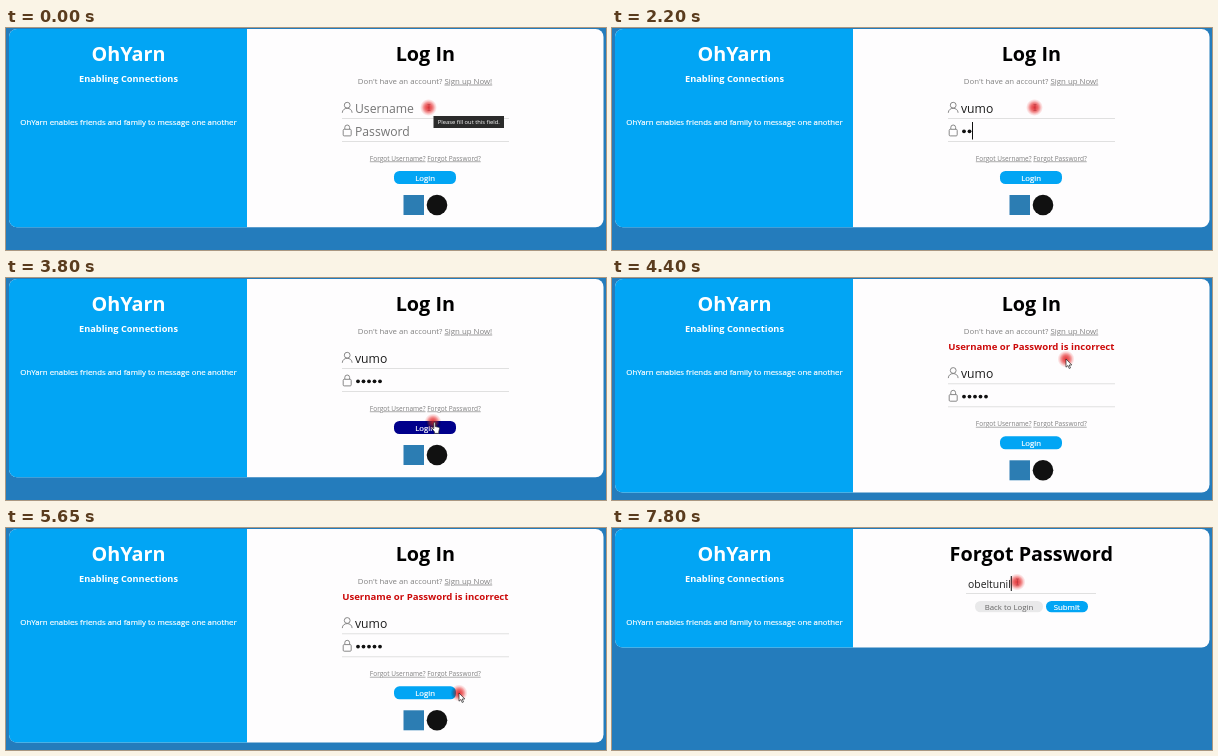
Animation, 600 px wide and 222 px high, one loop 8 s. Source, as an HTML page:

```html
<!DOCTYPE html>
<html lang="en">
<head>
<meta charset="utf-8">
<title>Log in</title>
<style>
  html, body { margin: 0; width: 100%; height: 100%; overflow: hidden; background: #247cbc; }
  svg { display: block; width: 100vw; height: 100vh; }
  text { font-family: "Open Sans", "Noto Sans", sans-serif; font-size: 7.83px; white-space: pre; }
  .mid { text-anchor: middle; }
  .title { font-size: 19.8px; font-weight: 700; }
  .sub { font-size: 9.23px; font-weight: 700; }
  .error { font-size: 9.6px; font-weight: 700; fill: #cc0a0a; }
  .field { font-size: 12.2px; fill: #1c1c1c; }
  .email { font-size: 10.4px; }
  .field.empty { fill: #757575; }
  .small { font-size: 6.53px; }
  .grey { fill: #808080; }
  .link { text-decoration: underline; }
  .white { fill: #fff; }
  .firm { stroke: #fff; stroke-width: .2; }
  .panel { fill: #02a5f4; }
  .rule { stroke: #e0e0e0; stroke-width: 1; }
  .icon { fill: none; stroke: #7c7c7c; stroke-width: .9; }
</style>
</head>
<body>
<svg viewBox="0 0 600 222" preserveAspectRatio="none">
  <defs>
    <clipPath id="cardClip"><rect id="card" x="3" y="1" width="594.5" height="198.3" rx="8"/></clipPath>
    <radialGradient id="halo">
      <stop offset="0" stop-color="#ee6464"/>
      <stop offset=".4" stop-color="#f48e8e"/>
      <stop offset=".75" stop-color="#facccc"/>
      <stop offset="1" stop-color="#fff"/>
    </radialGradient>
    <radialGradient id="core">
      <stop offset="0" stop-color="#e0282c" stop-opacity=".75"/>
      <stop offset=".5" stop-color="#e2383c" stop-opacity=".45"/>
      <stop offset="1" stop-color="#e84a4a" stop-opacity="0"/>
    </radialGradient>
  </defs>

  <rect width="600" height="222" fill="#247cbc"/>
  <g clip-path="url(#cardClip)">
    <rect width="600" height="222" fill="#fefdfe"/>
    <rect class="panel" width="241" height="222"/>
  </g>
  <g class="white mid">
    <text class="title" x="122.5" y="33">OhYarn</text>
    <text class="sub" x="122.5" y="53.8">Enabling Connections</text>
    <text class="firm" x="122.5" y="96.6">OhYarn enables friends and family to message one another</text>
  </g>

  <g id="login">
    <text class="title mid" x="419.3" y="33">Log In</text>
    <text class="grey mid" x="419" y="55.6">Don't have an account? <tspan class="link">Sign up Now!</tspan></text>
    <text id="error" class="error mid" x="419.3" y="72.3">Username or Password is incorrect</text>
    <g id="form">
      <g class="icon">
        <circle cx="341.2" cy="77.2" r="2.9"/>
        <path d="M336.3 84.8c0-6 9.8-6 9.8 0"/>
        <rect x="337.2" y="101.3" width="8" height="6.6" rx="1"/>
        <path d="M338.8 101v-1.6a2.4 2.4 0 0 1 4.8 0V101"/>
      </g>
      <path class="rule" d="M336 90.5H503M336 113.5H503"/>
      <text id="user" class="field" x="349" y="85"></text>
      <text id="pass" class="field empty" x="349" y="108">Password</text>
      <g id="dots" fill="#111"></g>
      <text class="small grey mid" x="419.3" y="132.5"><tspan class="link">Forgot Username?</tspan> <tspan class="link">Forgot Password?</tspan></text>
      <rect id="button" x="388" y="143" width="62" height="13" rx="5.5"/>
      <text class="white firm mid" x="419.2" y="152.6">Login</text>
      <rect x="397.5" y="167" width="20.5" height="20" fill="#2c7db3"/>
      <circle cx="431" cy="177" r="10.3" fill="#111"/>
    </g>
  </g>

  <g id="forgot">
    <text class="title mid" x="419.3" y="33">Forgot Password</text>
    <text id="email" class="field email" x="356" y="60.3"></text>
    <path class="rule" d="M354 65.5H484"/>
    <rect x="363" y="73" width="68" height="11.3" rx="5.5" fill="#e9e9ea"/>
    <text class="mid" x="397" y="81.6" fill="#666">Back to Login</text>
    <rect class="panel" x="434" y="73" width="42" height="11.3" rx="5.5"/>
    <text class="white firm mid" x="454.7" y="81.6">Submit</text>
  </g>

  <path id="caret" stroke="#111" stroke-width="1"/>

  <g id="tooltip">
    <rect x="427.5" y="88" width="70.5" height="12" fill="#2b2b2b"/>
    <text class="white mid" x="462.8" y="96.2" style="font-size:5.8px">Please fill out this field.</text>
  </g>

  <circle id="glow" r="8.5" fill="url(#halo)" style="mix-blend-mode:multiply"/>
  <g id="cursor">
    <circle r="6.5" fill="url(#core)"/>
    <path id="beam" d="M-1 -3H2M.5 -3V3M-1 3H2" stroke="#a32c38" stroke-width=".7" opacity=".6"/>
    <path id="arrow" d="M0 0V8.2L1.9 6.5 3.2 9.5 4.5 8.9 3.2 6H5.8Z" fill="#fff" stroke="#222" stroke-width=".7"/>
    <path id="hand" d="M.8 .7q1-1 1.6 0V4.6l3.2.6q1 .3 1 1.3L5.8 9.6V11.4H1.4V9.8L-1.2 6.6q0-1.2 1-.8L.8 6.7Z" fill="#fff" stroke="#222" stroke-width=".7"/>
  </g>
</svg>
<script>
const LOOP = 8000, STEP = 50;
const ERROR_AT = 4050, FORGOT_AT = 6100, ERROR_SHIFT = 15.3;
const $ = id => document.getElementById(id);
const show = (id, on) => $(id).style.display = on ? "" : "none";

const userKeys = [1300, 1400, 1500, 1650];
const passKeys = [2000, 2200, 2300, 2350, 2400];
const emailKeys = [6950, 7000, 7100, 7200, 7350, 7450, 7550, 7650, 7800];
const typed = (keys, t) => keys.filter(k => k <= t).length;

// time, x, y of the pointer
const route = [
  [2950, 422.5, 79.5], [3700, 427, 143], [3800, 427, 144], [4050, 427, 144],
  [4400, 454, 81], [4550, 456, 79], [4700, 456, 79], [5100, 464, 112],
  [5500, 454, 167], [5650, 453, 165], [5900, 452, 146], [6150, 452, 145.5], [6450, 405, 54]
];

function pointerAt(t) {
  const next = route.findIndex(p => p[0] > t);
  if (next === 0) return route[0].slice(1);
  if (next < 0) return route[route.length - 1].slice(1);
  const [t0, x0, y0] = route[next - 1], [t1, x1, y1] = route[next];
  const u = (t - t0) / (t1 - t0), e = u * u * (3 - 2 * u);
  return [x0 + (x1 - x0) * e, y0 + (y1 - y0) * e];
}

function fill(id, text, count, placeholder) {
  const el = $(id);
  el.textContent = count ? text.slice(0, count) : placeholder;
  el.classList.toggle("empty", !count);
  return count ? el.getComputedTextLength() : 0;
}

for (let i = 0; i < passKeys.length; i++) {
  const dot = document.createElementNS("http://www.w3.org/2000/svg", "circle");
  dot.setAttribute("cx", 352 + 5.5 * i);
  dot.setAttribute("cy", 103.3);
  dot.setAttribute("r", 1.9);
  $("dots").append(dot);
}

function draw(t) {
  const forgot = t >= FORGOT_AT, failed = t >= ERROR_AT;
  const shift = failed ? ERROR_SHIFT : 0;
  show("login", !forgot);
  show("forgot", forgot);
  show("error", failed);
  show("tooltip", t < 50);
  $("card").setAttribute("height", forgot ? 118.6 : 198.3 + shift);
  $("form").setAttribute("transform", `translate(0 ${shift})`);

  const userEnd = fill("user", "vumo", typed(userKeys, t), "Username");
  const emailEnd = fill("email", "obeltunil", typed(emailKeys, t), "Email");
  const dots = typed(passKeys, t);
  show("pass", !dots);
  [...$("dots").children].forEach((d, i) => d.style.display = i < dots ? "" : "none");

  let caret = "";
  if ((t >= 100 && t < 600) || (t >= 1000 && t < 2000)) caret = `M${349.5 + userEnd} 72V88`;
  else if (t >= 2000 && t < 2950) caret = `M${349.5 + 5.5 * dots} 94V111.5`;
  else if (t >= 6600) caret = `M${356.5 + emailEnd} 48V63`;
  $("caret").setAttribute("d", caret);

  const [x, y] = pointerAt(t);
  const inside = (l, top, r, b) => x >= l && x <= r && y >= top && y <= b;
  const onButton = !forgot && inside(388, 143 + shift, 450, 156 + shift);
  const onLink = !forgot && inside(364, 126 + shift, 475, 134 + shift);
  const onField = forgot ? inside(354, 47, 484, 65) : inside(348, 71 + shift, 503, 113 + shift);
  $("button").setAttribute("fill", onButton ? "#00008b" : "#02a5f4");
  show("hand", onButton || onLink);
  show("beam", onField);
  show("arrow", !onButton && !onLink && !onField);
  for (const id of ["glow", "cursor"]) $(id).setAttribute("transform", `translate(${x} ${y})`);
}

function tick() {
  const t = performance.now() % LOOP;
  draw(Math.floor(t / STEP) * STEP);
  requestAnimationFrame(tick);
}
tick();
</script>
</body>
</html>
```
